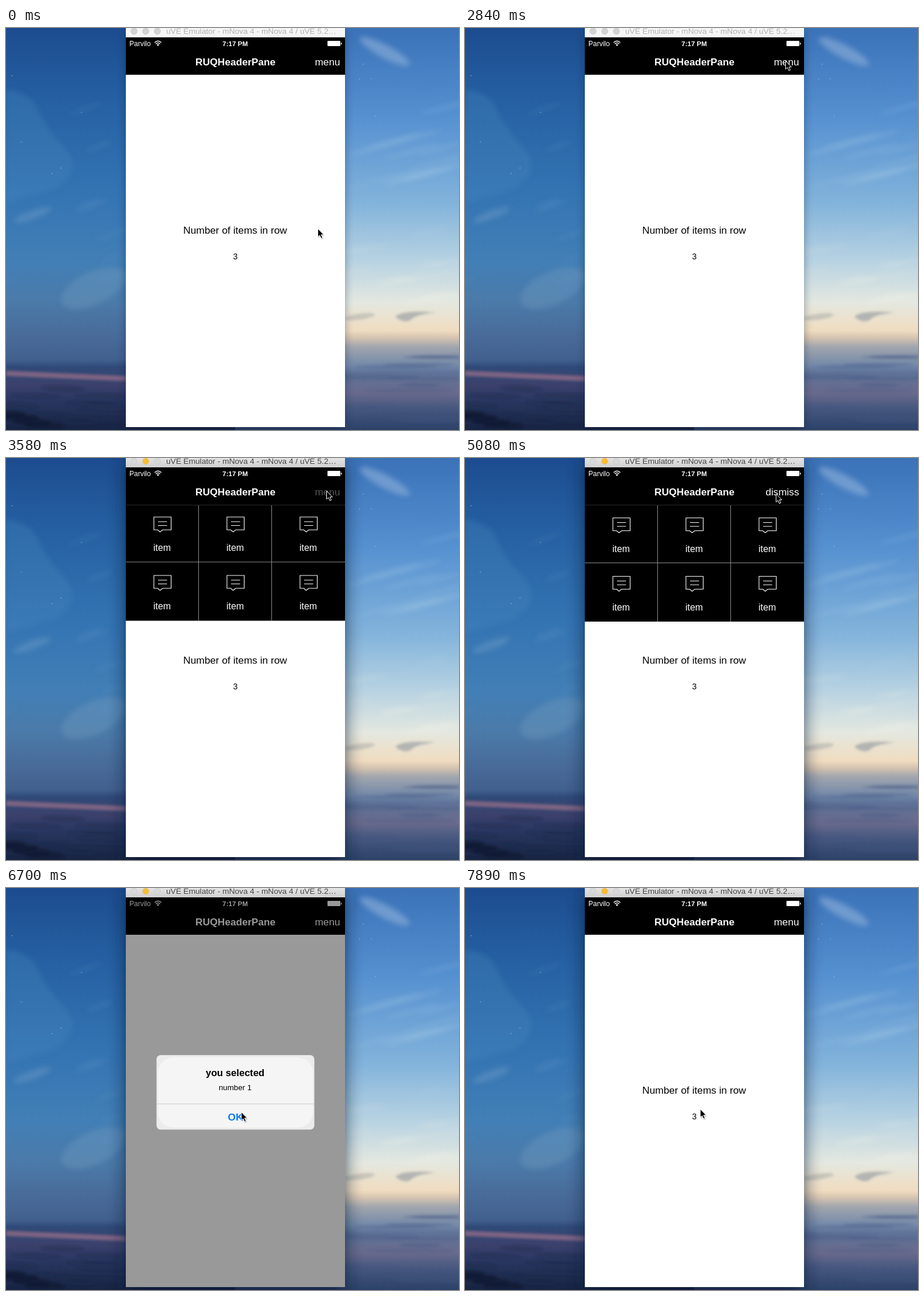
Animation of 775x688 px, one loop 8 s. Source, as an HTML page:

```html
<!DOCTYPE html>
<html lang="en">
<head>
<meta charset="utf-8">
<title>Navbar menu demo</title>
<style>
  html, body { margin: 0; width: 100%; height: 100%; overflow: hidden; background: #234; }
  svg { display: block; width: 775px; height: 688px; }
  text { font-family: "Liberation Sans", Arial, sans-serif; white-space: pre; }
</style>
</head>
<body>
<svg id="stage" viewBox="0 0 775 688" xmlns="http://www.w3.org/2000/svg"></svg>
<script>
const LOOP = 8000;
const TICK = 148.7;

const mid = 'text-anchor="middle"';
const bold = 'font-weight="bold"';
const text = (x, y, size, str, opt = '') =>
  `<text x="${x}" y="${y}" font-size="${size}" ${opt}>${str}</text>`;
const rect = (x, y, w, h, fill, opt = '') =>
  `<rect x="${x}" y="${y}" width="${w}" height="${h}" fill="${fill}" ${opt}/>`;
const line = (d, color, opt = '') => `<path d="${d}" fill="none" stroke="${color}" ${opt}/>`;
const blob = (x, y, rx, ry, fill, alpha, turn = 0) =>
  `<ellipse rx="${rx}" ry="${ry}" fill="${fill}" opacity="${alpha}" transform="translate(${x} ${y}) rotate(${turn})"/>`;
const repeat = (n, make) => Array.from({ length: n }, (_, i) => make(i)).join('');
const blur = (id, dev) =>
  `<filter id="${id}" x="-50%" y="-50%" width="200%" height="200%"><feGaussianBlur stdDeviation="${dev}"/></filter>`;
const gradient = (id, height, stops) =>
  `<linearGradient id="${id}" x1="0" y1="0" x2="0" y2="1">${stops.split(' ').map(s => {
    const [y, color] = s.split('#');
    return `<stop offset="${y / height}" stop-color="#${color}"/>`;
  }).join('')}</linearGradient>`;

let seed = 7;
const random = (lo, hi) => {
  seed = seed * 16807 % 2147483647;
  return lo + (hi - lo) * seed / 2147483647;
};

const defs = `<defs>
  ${gradient('west', 688, '0#1c4c8f 120#2560a2 280#3474b3 400#427fb6 470#4b7aa9 530#486a98 568#42608e 580#2f4a78 610#3b416c 640#28365f 688#172442')}
  ${gradient('east', 688, '0#3b72b8 150#5590d0 300#82b3db 400#b8d3e2 470#e4e8e0 518#f0dcc0 530#d6c4b0 545#a3a7ae 578#7288a9 590#5f7398 625#686a8c 650#475880 688#2c4268')}
  ${gradient('metal', 16, '0#e4e4e4 16#d0d0d0')}
  ${blur('soft', 5)}${blur('thin', 2)}${blur('near', 8)}${blur('far', 15)}${blur('tiny', 0.8)}
  <clipPath id="below"><rect x="205" y="80" width="375" height="603"/></clipPath>
</defs>`;

const streaks = (n, x, y0, y1, length, color, alpha, turn) => repeat(n, () =>
  blob(random(x, x + 195), random(y0, y1), random(length / 3, length), random(1, 5), color, alpha, turn));

const wallpaper = `
  ${rect(0, 0, 392, 688, 'url(#west)')}
  ${rect(392, 0, 383, 688, 'url(#east)')}
  <g filter="url(#soft)">
    <path d="M0 105Q45 112 55 140T100 205T85 275L0 300Z" fill="#4a87bd" opacity=".3"/>
    ${blob(150, 445, 60, 28, '#6f9bbd', .4, -25)}
    ${blob(648, 40, 48, 11, '#9dbbe0', .5, 28)}
    ${blob(45, 320, 34, 7, '#78a4ca', .4, -20)}
    ${streaks(8, 0, 120, 460, 40, '#7ba7cc', .15, -20)}
    ${streaks(12, 580, 120, 380, 90, '#b5d3ec', .25, -15)}
    ${streaks(8, 580, 380, 470, 80, '#f2f1e8', .3, -8)}
  </g>
  <g filter="url(#thin)">
    ${blob(605, 494, 26, 5, '#b3b2ac', .6, -8)}
    <path d="M666 494Q680 482 735 487Q700 490 692 500Q680 506 666 494Z" fill="#a7a9aa" opacity=".8"/>
    ${line('M0 591L205 600', '#7d6383', 'stroke-width="9"')}
    ${streaks(12, 0, 615, 680, 90, '#1a2748', .35, 2)}
    ${streaks(12, 580, 560, 680, 90, '#3f5580', .3, 0)}
    ${repeat(4, i => blob(i * 22, 660 + i * 7, 34, 6, '#121a32', .7))}
  </g>
  ${repeat(9, i => blob(random(0, 130) + i % 2 * 600, random(60, 260), .8, .8, '#a9c8e6', .8))}`;

const shadows = `
  ${rect(207, 4, 371, 682, '#0a1c38', 'id="idleShadow" opacity=".5" filter="url(#near)"')}
  ${rect(205, 8, 375, 690, '#0a1c38', 'id="liveShadow" opacity=".72" filter="url(#far)"')}`;

const titleBar = rect(205, 0, 375, 16, '#f6f6f6', 'id="titleBar"')
  + repeat(3, i => `<circle id="light${i}" cx="${219 + 20 * i}" cy="5.5" r="5.5" stroke="#c4c4c4" stroke-width=".6"/>`)
  + text(274, 10, 13.65, 'uVE Emulator - mNova 4 - mNova 4 / uVE 5.2…', 'id="caption"');

const cell = (x, y) => `<g transform="translate(${x} ${y})">
  ${line('M48 22.500H77.500V44.500H63L58.500 48L54.500 44.500H48ZM55 30.500H70.500M55 37H70.500', '#fff', 'stroke-width="1.1"')}
  ${text(62, 81, 16, 'item', `fill="#fff" ${mid}`)}</g>`;

const menu = `<g clip-path="url(#below)"><g id="menu">
  ${rect(205, -20, 375, 300, '#000')}
  ${line('M329.500 80V280M454.500 80V280M205 179.500H580', '#8c8c8c')}
  ${repeat(6, i => cell(205 + i % 3 * 125, 80 + Math.floor(i / 3) * 100))}</g></g>`;

const phone = `
  ${rect(205, 16, 375, 667, '#fff')}
  ${text(392, 352, 17.3, 'Number of items in row', mid)}
  ${text(392.5, 396, 14, '3', mid)}
  ${menu}
  ${rect(205, 16, 375, 64, '#000')}
  ${line('M205 80.500H580', '#262626', 'id="hairline"')}
  <g fill="#fff">
    ${text(211, 31, 12, 'Parvilo')}
    ${text(392, 31, 11.5, '7:17 PM', `${bold} ${mid}`)}
    ${text(392.5, 64, 17.1, 'RUQHeaderPane', `${bold} ${mid}`)}
    ${text(571.5, 64, 17.2, 'menu', 'id="action" text-anchor="end"')}
    ${rect(550, 22, 22, 9, '#fff', 'rx="1"')}${rect(573, 25, 1.5, 3.5, '#fff', 'rx=".7"')}
    <path d="M260 31L257.800 28.600Q260 27 262.200 28.600Z"/>
  </g>
  ${line('M254.300 25Q260 19.600 265.700 25M256.200 27.200Q260 23.800 263.800 27.200', '#fff', 'stroke-width="1.5"')}
  ${rect(205, 16, 375, 667, '#000', 'id="dim"')}`;

const alertBox = `<g id="alert">
  ${rect(257.5, 286, 270, 127.5, '#ececec', 'rx="7"')}
  ${rect(260, 290, 265, 120, '#f5f5f5', 'rx="26"')}
  ${line('M257.500 369.500H527.500', '#cfcfcf')}
  ${text(392, 321.5, 16.6, 'you selected', `${bold} ${mid}`)}
  ${text(392, 346, 13.3, 'number 1', mid)}
  ${text(392.5, 398, 17.2, 'OK', `${bold} fill="#0b7cf4" ${mid}`)}</g>`;

const arrow = 'M.500 .500V14.500L3.700 11.700L6.100 17L8.500 16L6.200 10.800H10.500Z';
const pointer = `<g id="pointer">
  <path d="${arrow}" transform="translate(1 1.5)" opacity=".4" filter="url(#tiny)"/>
  <path d="${arrow}" stroke="#fff"/></g>`;

const stage = document.getElementById('stage');
stage.innerHTML = defs + wallpaper + shadows + titleBar + phone + alertBox + pointer;
const $ = id => document.getElementById(id);
const set = (id, name, value) => $(id).setAttribute(name, value);
const show = (id, on) => set(id, 'visibility', on ? 'visible' : 'hidden');

// Smooth 0..1 between two ticks
const ease = (tick, from, to) => {
  const u = Math.min(1, Math.max(0, (tick - from) / (to - from)));
  return u * u * u * (u * (6 * u - 15) + 10);
};

// Pointer strokes in ticks; "bend" pulls the middle of the path sideways
const strokes = [
  { from: 0, to: 1, x: 532, y: 343 },
  { from: 6, to: 8, x: 529, y: 341 },
  { from: 11, to: 18, x: 551, y: 42, bend: -35 },
  { from: 18, to: 19, x: 548, y: 56 },
  { from: 33, to: 38, x: 266, y: 140 },
  { from: 41, to: 45, x: 402, y: 383 },
  { from: 52, to: 53, x: 402, y: 378 },
];

function pointerAt(tick) {
  let x = 533, y = 343;
  for (const s of strokes) {
    const u = ease(tick, s.from, s.to);
    x += (s.x - x) * u + (s.bend || 0) * 2 * u * (1 - u);
    y += (s.y - y) * u;
  }
  return `${x} ${y}`;
}

// Springs down into place, later dips a little before it leaves
const menuOffset = tick => -200 * Math.exp(-1.63 * (tick - 21)) + 20 * ease(tick, 38, 40.6);

function draw(ms) {
  const tick = Math.floor((ms % LOOP) / TICK);

  const live = tick >= 21;
  show('idleShadow', !live);
  show('liveShadow', live);
  set('titleBar', 'fill', live ? 'url(#metal)' : '#f6f6f6');
  set('caption', 'fill', live ? '#444' : '#b2b2b2');
  for (let i = 0; i < 3; i++) {
    set('light' + i, 'fill', !live ? '#d2d2d2' : i === 1 ? '#fdbc2e' : '#d8d8d8');
  }

  const open = tick > 21 && tick < 41;
  show('menu', open);
  show('hairline', open);
  set('menu', 'transform', `translate(0 ${open ? menuOffset(tick) : 0})`);
  $('action').textContent = tick >= 28 && tick < 42 ? 'dismiss' : 'menu';
  set('action', 'fill', tick >= 22 && tick < 28 ? '#555' : '#fff');

  const enter = ease(tick, 38, 41);
  const shown = enter - ease(tick, 47, 49);
  set('dim', 'opacity', 0.4 * shown);
  set('alert', 'opacity', shown);
  set('alert', 'transform', `translate(392.5 349.75) scale(${1.2 - 0.2 * enter}) translate(-392.5 -349.75)`);
  set('pointer', 'transform', `translate(${pointerAt(tick)})`);
}

function loop(now) {
  draw(now);
  requestAnimationFrame(loop);
}
draw(0);
requestAnimationFrame(loop);
</script>
</body>
</html>
```
